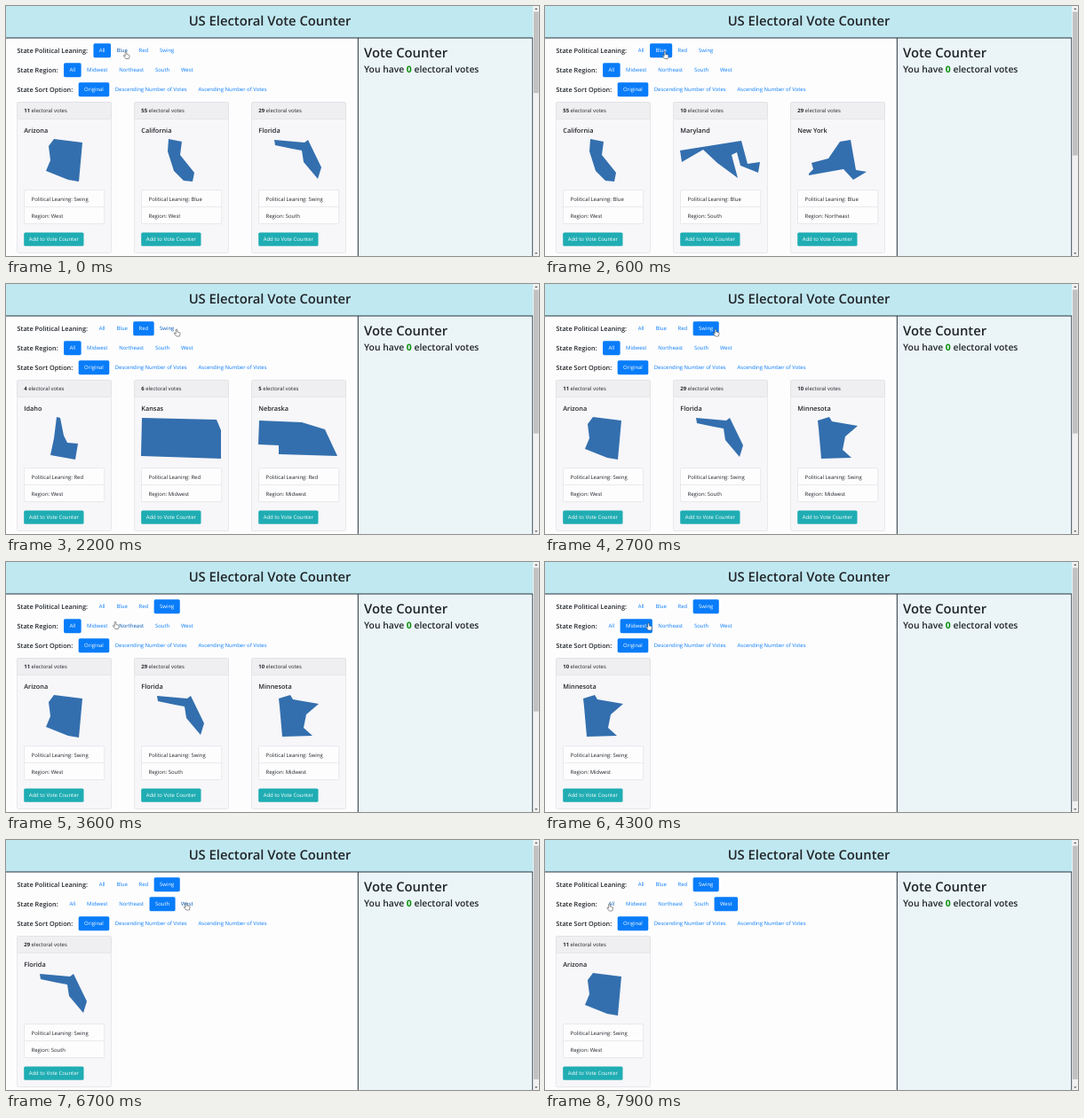
These frames come from a looping animation (600 by 282 pixels, 8000 ms). An HTML page:

```html
<!DOCTYPE html>
<html lang="en">
<head>
<meta charset="utf-8">
<title>US Electoral Vote Counter</title>
<style>
html, body { margin: 0; width: 100%; height: 100%; overflow: hidden; background: #fdfdfe; }
svg { display: block; width: 100vw; height: 100vh; }
text { font: 5.95px "Open Sans", "Noto Sans", sans-serif; fill: #212529; text-rendering: geometricPrecision; white-space: pre; }
.h1 { font-size: 14.8px; font-weight: 600; }
.h3 { font-size: 10.33px; font-weight: 600; }
.h5 { font-size: 7.3px; font-weight: 600; }
.b { font-weight: 700; }
.link { fill: #087cf9; }
.hover { fill: #0056b3; }
.white { fill: #fff; font-weight: 500; }
.mid { text-anchor: middle; }
</style>
</head>
<body>
<svg viewBox="0 0 600 282">
  <rect width="593.5" height="36" fill="#c0e8f0"/>
  <rect x="396" y="36" width="197" height="246" fill="#ebf5f8"/>
  <path d="M0 36H593M396.3 36V282M592.8 36V282" stroke="#26343f"/>
  <rect x="593.5" width="6.5" height="282" fill="#f1f1f1"/>
  <rect id="thumb" x="594" y="6.5" width="5.6" fill="#c1c1c1"/>
  <path d="M595.2 4l1.6-1.8 1.6 1.8zM595.2 278.3l1.6 1.8 1.6-1.8z" fill="#505050"/>
  <text class="h1 mid" x="297" y="22.4">US Electoral Vote Counter</text>
  <text class="h1" x="403" y="57.5">Vote Counter</text>
  <text class="h3" x="403" y="75.3">You have <tspan class="b" fill="#0a8f0a">0</tspan> electoral votes</text>
  <g id="filters"></g>
  <g id="cards"></g>
  <path id="hand" fill="#fff" stroke="#333" stroke-width=".6" stroke-linejoin="round"
    d="M-.9.8Q-.9-.1 0-.1T.9.8V3.4L3.7 4.1Q4.7 4.4 4.6 5.4L4.1 8 3.7 9.1H-.2L-2.8 5.7Q-3.4 4.6-2.4 4.6L-.9 5.6Z"/>
</svg>
<script>
const LOOP = 8000, STEP = 100, PAD = 6.4;
const $ = id => document.getElementById(id);

const filters = [
  ["State Political Leaning:", "All", "Blue", "Red", "Swing"],
  ["State Region:", "All", "Midwest", "Northeast", "South", "West"],
  ["State Sort Option:", "Original", "Descending Number of Votes", "Ascending Number of Votes"]
];

// Name: votes, leaning, region, rough outline
const states = {
  Arizona: [11, "Swing", "West", "34 0 66 4 62 48 50 46 25 36 30 24 28 8"],
  California: [55, "Blue", "West", "31 0 46 3 44 18 60 38 58 48 48 47 37 36 30 14"],
  Florida: [29, "Swing", "South", "18 1 52 4 56 1 71 32 67 45 51 26 49 13 38 11 19 7"],
  Maryland: [10, "Blue", "South", "0 13 69 2 76 28 90 26 88 38 68 30 64 15 58 18 65 44 42 27 26 12 2 26"],
  "New York": [29, "Blue", "Northeast", "13 39 18 34 16 27 35 22 48 3 60 1 66 35 78 37 63 46 52 34 13 41"],
  Idaho: [4, "Red", "West", "37 0 41 1 45 21 49 29 61 30 58 48 30 43 34 24"],
  Kansas: [6, "Red", "Midwest", "1 1 85 3 90 15 90 47 0 44"],
  Nebraska: [5, "Red", "Midwest", "1 4 49 6 75 14 89 44 23 42 23 32 0 31"],
  Minnesota: [10, "Swing", "Midwest", "23 4 36 0 39 5 68 10 54 22 51 37 61 46 27 47 24 13"],
  Pennsylvania: [20, "Swing", "Northeast", "8 11 12 6 14 10 72 1 78 7 82 22 71 36 15 47"]
};

// Click time, leaning, region, pointer position
const clicks = [
  [-500, "All", "All", 135, 51.5],
  [500, "Blue", "All", 135, 51.5],
  [1700, "Red", "All", 153.5, 53.5],
  [2400, "Swing", "All", 192, 51],
  [4000, "Swing", "Midwest", 116.5, 69],
  [5000, "Swing", "Northeast", 143, 70],
  [5800, "Swing", "South", 178.5, 70.5],
  [6800, "Swing", "West", 203, 71],
  [8100, "Swing", "All", 72.5, 72]
];

const rect = (x, y, w, h, fill, extra = "") =>
  `<rect x="${x}" y="${y}" width="${w}" height="${h}" fill="${fill}" ${extra}/>`;
const text = (x, y, s, cls = "") => `<text x="${x}" y="${y}" class="${cls}">${s}</text>`;

const pen = document.createElement("canvas").getContext("2d");
function textWidth(s, size, weight) {
  pen.font = `${weight} 100px "Open Sans", "Noto Sans", sans-serif`;
  return pen.measureText(s).width * size / 100;
}

// Rests 300 ms after a click, then arrives 200 ms before the next one
function pointer(t, from, to) {
  const start = from[0] + 300, end = to[0] - 200;
  const p = Math.min(1, Math.max(0, (t - start) / (end - start)));
  const e = p * p * (3 - 2 * p);
  return [3, 4].map(i => from[i] + (to[i] - from[i]) * e);
}

function filterRow([label, ...options], row, chosen, [px, py]) {
  const y = 50.2 + 22 * row;
  let x = 12.5 + textWidth(label, 7.3, 600) + PAD;
  let out = text(12.5, y + 2.7, label, "h5");
  for (const name of options) {
    const w = textWidth(name, 5.95, 400) + 2 * PAD;
    const over = px >= x && px < x + w && Math.abs(py - y) < 8;
    const active = name === chosen;
    if (active) out += rect(x, y - 8, w, 16, "#087cf9", 'rx="1.6"');
    out += text(x + w / 2, y + 2.2, name, "mid " + (active ? "white" : over ? "hover" : "link"));
    x += w;
  }
  return out;
}

function card(name, column) {
  const [votes, leaning, region, outline] = states[name];
  const line = 'stroke="#dedde1" stroke-width=".6"';
  return `<g transform="translate(${column * 132})">` +
    rect(12.5, 108.5, 106, 170, "#f7f6f9", line + ' rx="1.6"') +
    rect(12.5, 108.5, 106, 19, "#efeef1", line + ' rx="1.6"') +
    text(20.3, 120.2, `<tspan class="b">${votes}</tspan> electoral votes`) +
    text(20.3, 143.2, name, "h5") +
    `<polygon transform="translate(20 150)" points="${outline}" fill="#336fae"/>` +
    rect(20.5, 207.6, 90.2, 38, "#fdfdfe", line + ' rx="1.4"') +
    `<path d="M20.5 226.6h90.2" ${line}/>` +
    text(28.6, 219.6, "Political Leaning: " + leaning) +
    text(28.6, 238.8, "Region: " + region) +
    rect(20.2, 255.6, 67.3, 15.2, "#1fadb3", 'rx="1.6"') +
    text(53.8, 265.4, "Add to Vote Counter", "mid white") + "</g>";
}

function draw(t) {
  const now = clicks.findLastIndex(c => c[0] <= t);
  const [, leaning, region] = clicks[now];
  const chosen = [leaning, region, "Original"];
  const at = pointer(t, clicks[now], clicks[now + 1]);
  const matches = (want, value) => want === "All" || want === value;
  $("filters").innerHTML = filters.map((f, i) => filterRow(f, i, chosen[i], at)).join("");
  $("cards").innerHTML = Object.keys(states)
    .filter(n => matches(leaning, states[n][1]) && matches(region, states[n][2]))
    .slice(0, 3).map(card).join("");
  // The thumb shrinks as more rows of cards lengthen the page
  const rows = region !== "All" ? 1 : leaning !== "All" ? 2 : 4;
  $("thumb").setAttribute("height", 269 * 282 / (108 + 180 * rows));
  $("hand").setAttribute("transform", `translate(${at}) scale(.88)`);
}

const start = performance.now();
let last = -1;
function tick() {
  const t = Math.floor((performance.now() - start) % LOOP / STEP) * STEP;
  if (t !== last) draw(last = t);
  requestAnimationFrame(tick);
}
tick();
</script>
</body>
</html>
```
